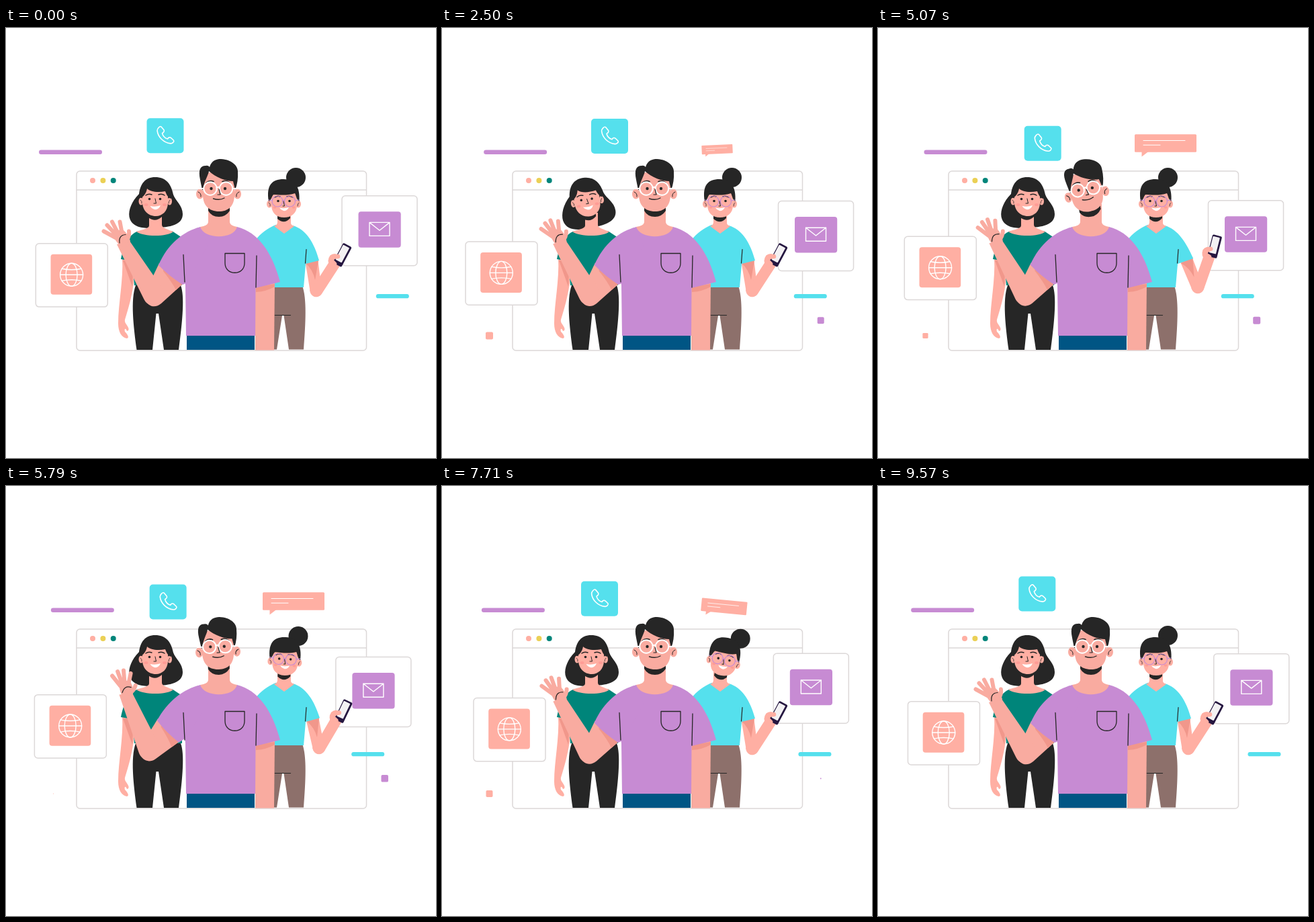
Animation of 640 by 640 pixels, one loop 9640 ms. Source, as an HTML page with a canvas:

```html
<!DOCTYPE html>
<html lang="en">
<head>
<meta charset="utf-8">
<title>Team greeting</title>
<style>
html, body { margin: 0; width: 100%; height: 100%; overflow: hidden; background: #fff; }
canvas { display: block; width: 640px; height: 640px; }
</style>
</head>
<body>
<canvas id="stage"></canvas>
<script>
const LOOP = 9640, FRAME = 1000 / 14;
const INK = '#262626', SKIN = '#ffafa3', TAN = '#f9aba0', SHADE = '#f1978b';
const PURPLE = '#c78bd3', TEAL = '#00857a', CYAN = '#55e0ed', GREY = '#dcd8d8';

const canvas = document.getElementById('stage');
const ctx = canvas.getContext('2d');
const dpr = window.devicePixelRatio || 1;
canvas.width = canvas.height = 640 * dpr;

function fill(color, d) {
  ctx.fillStyle = color;
  ctx.fill(new Path2D(d));
}
function line(color, width, d) {
  ctx.strokeStyle = color;
  ctx.lineWidth = width;
  ctx.lineCap = ctx.lineJoin = 'round';
  ctx.stroke(new Path2D(d));
}
function oval(color, x, y, rx, ry = rx) {
  ctx.fillStyle = color;
  ctx.beginPath();
  ctx.ellipse(x, y, rx, ry, 0, 0, 7);
  ctx.fill();
}
function ring(color, width, x, y, rx, ry = rx) {
  ctx.strokeStyle = color;
  ctx.lineWidth = width;
  ctx.beginPath();
  ctx.ellipse(x, y, rx, ry, 0, 0, 7);
  ctx.stroke();
}
function box(x, y, w, h, r, color, border) {
  ctx.beginPath();
  ctx.roundRect(x, y, w, h, r);
  ctx.fillStyle = color;
  ctx.fill();
  if (border) {
    ctx.strokeStyle = border;
    ctx.lineWidth = 1.5;
    ctx.stroke();
  }
}
function at(x, y, draw) {
  ctx.save();
  ctx.translate(x, y);
  draw();
  ctx.restore();
}
function spin(x, y, deg, draw) {
  ctx.save();
  ctx.translate(x, y);
  ctx.rotate(deg * Math.PI / 180);
  ctx.translate(-x, -y);
  draw();
  ctx.restore();
}
function turn(x, y, cx, cy, deg) {
  const c = Math.cos(deg * Math.PI / 180), s = Math.sin(deg * Math.PI / 180);
  return [cx + (x - cx) * c - (y - cy) * s, cy + (x - cx) * s + (y - cy) * c];
}

// Eased steps between [time, value] pairs, holding at both ends.
function keys(t, ...k) {
  if (t <= k[0][0]) return k[0][1];
  for (let i = 1; i < k.length; i++) {
    const [t0, a] = k[i - 1], [t1, b] = k[i];
    if (t < t1) {
      const u = (t - t0) / (t1 - t0);
      return a + (b - a) * u * u * (3 - 2 * u);
    }
  }
  return k[k.length - 1][1];
}

// Smooth closed curve through values at shared times.
const TIMES = [0, 1000, 2500, 3930, 5070, 6570, 7710];
function drift(t, v) {
  const n = TIMES.length;
  const time = i => TIMES[(i + n) % n] + LOOP * Math.floor(i / n);
  const val = i => v[(i + n) % n];
  const slope = i => (val(i + 1) - val(i - 1)) / (time(i + 1) - time(i - 1));
  let i = 0;
  while (i < n - 1 && t >= TIMES[i + 1]) i++;
  const h = time(i + 1) - time(i), u = (t - time(i)) / h, w = 1 - u;
  return (1 + 2 * u) * w * w * val(i) + u * w * w * h * slope(i)
    + u * u * (3 - 2 * u) * val(i + 1) - u * u * w * h * slope(i + 1);
}

function browser() {
  box(105, 213, 431.5, 267, 5, '#fff', GREY);
  line(GREY, 1.5, 'M105 241H536');
  oval(SKIN, 129, 227, 4);
  oval('#ebd055', 144.4, 227, 4);
  oval(TEAL, 159.7, 227, 4);
}

function globeCard() {
  box(0, 0, 107, 94.3, 5, '#fff', GREY);
  box(22.2, 16, 61.7, 60, 4, SKIN);
  at(53.3, 46.4, () => {
    ring('#fff', 1.4, 0, 0, 17);
    ring('#fff', 1.4, 0, 0, 8.5, 17);
    line('#fff', 1.4, 'M-17 0H17M-14.5 -9Q0 -6 14.5 -9M-14.5 9Q0 6 14.5 9');
  });
}

function mailCard() {
  box(0, 0, 112, 104, 5, '#fff', GREY);
  box(24.5, 23.5, 63.2, 53.5, 4, PURPLE);
  line('#fff', 1.4, 'M41 39.7H71V59.7H41ZM41 39.7L56 51.5L71 39.7');
}

function callCard() {
  box(0, 0, 55, 52, 5, CYAN);
  line('#fff', 1.6, 'M21.5 12.6L25.4 17.2C26.6 19 25.6 20.6 23 22.3C24 26.5 27 29.5 31 30.8C32.5 28.3 34.5 27.8 36.4 29.5L40 33C41.3 35 38 37.8 35.5 37.6C25 36.5 16.7 28 15.6 18.5C15.4 15.5 19.4 11.2 21.5 12.6Z');
}

function bubble(t) {
  const size = keys(t, [2200, 0], [2800, 1], [7500, 1], [8140, 0]);
  if (size < 0.01) return;
  const tilt = (1 - size) * (t < 5000 ? -5 : 21);
  ctx.save();
  ctx.translate(392, 191.5);
  ctx.rotate(tilt * Math.PI / 180);
  ctx.scale(size, size);
  box(-10, -33.3, 92, 26.5, 1.5, SKIN);
  fill(SKIN, 'M.5 -8V0L11 -8Z');
  line('#fff', 1, 'M3 -24H65M3 -17.3H28');
  ctx.restore();
}

function square(color, x, y, s) {
  if (s > 0.2) box(x - s / 2, y - s / 2, s, s, s * 0.18, color);
}

function leftWoman(tilt) {
  // Resting arm and hand
  fill(SKIN, 'M173 342C175 375 167 410 167 440C167 452 172 461 180 462C184 461 181 456 177 452C176 449 177 446 179 449C180 453 184 450 182 446C180 441 176 439 177 434C183 415 187 400 190 380V342Z');
  fill(SHADE, 'M174 346L188 385L190 346Z');
  fill(INK, 'M193 383H260C266 398 263 435 257 479H235L227 425H223.5L218 479H194.5C190 445 185 405 193 383Z');
  fill(TEAL, 'M197 302C181 308 175 325 171 344L188 347L191 383H262V312L247 302Z');
  spin(223, 308, tilt, () => {
    fill(INK, 'M222 222C207 222 200 232 198 247C187 258 182 271 183.5 281C187 298 207 299 222 297C244 297 263 293 263 277C263 264 252 257 249 248C246 232 238 222 222 222Z');
  });
  fill(SKIN, 'M213 275H232V293C232 298 242 300 249 303C240 311 205 311 194 303C202 300 213 299 213 294Z');
  spin(223, 300, tilt, () => {
    fill(INK, 'M212 271H232V281Q222 290 212 282Z');
    oval(SKIN, 201, 258, 3.5, 5.5);
    oval(SKIN, 243.5, 258, 3.5, 5.5);
    line(INK, .8, 'M200 256Q203 258 202 261M244 256Q242 258 242 261');
    fill(SKIN, 'M203 243C203 230 241 230 241 245V260C241 273 232 280 223 280C211 280 203 271 203 259Z');
    fill(INK, 'M200 253C199 232 207 224 222 224C238 224 246 236 245 254C241 253 238 246 237 243C226 245 215 244 210 239C209 246 204 252 200 253Z');
    line(INK, 1.5, 'M208 249Q212 246 217 248M227 248Q232 246 236 249');
    oval(INK, 213.5, 254.5, 1.8);
    oval(INK, 229.5, 254.5, 1.8);
    line(INK, 1, 'M222 254L223.5 261H220');
    fill('#fff', 'M214.5 265Q222 267 230 264Q227 271 221 270Q217 269 214.5 265Z');
    oval('#ff9c96', 208.5, 263, 3, 2);
    oval('#ff9c96', 236, 263, 3, 2);
  });
}

function rightWoman(tilt, raise, swing) {
  fill('#8d706b', 'M385 384H441C448 402 446 440 443 478.5H421L413.5 428H411L403 478.5H385Z');
  line(INK, 1.2, 'M400 427.5H423.5');

  const [ex, ey] = turn(461, 391, 448, 330, -14 * raise);
  spin(448, 330, -14 * raise, () => {
    fill(SKIN, 'M445 345L464 343L468 375L471 393C468 402 457 403 453 394Z');
    fill(SHADE, 'M446 350L465 346L460 375Q457 360 446 350Z');
  });
  at(ex - 461, ey - 391, () => spin(461, 391, swing, () => {
    fill(SKIN, 'M452 390C454 402 466 403 471 394L497 354L481 348L463 376Z');
    oval(SKIN, 489, 346.5, 9.5, 10.5);
    spin(500.5, 337.5, 28, () => {
      box(493.5, 321, 14.5, 33.5, 2, '#251640');
      box(494.7, 323.5, 10.5, 25, 1, '#f3f1f3');
    });
    line(SKIN, 6.5, 'M485 341L494 340M487 349L489 351');
  }));

  const [cx, cy] = turn(466, 346, 443, 318, -7 * raise);
  fill(CYAN, `M401 293C390 298 378 306 372 315V386H443L446 351L${cx} ${cy}C459 320 447 300 427 294Z`);
  line(INK, 1.2, 'M447 329.5L445.5 350');
  fill(SKIN, 'M404 277H424V290C424 293 427 294 429 295L414 306L399 295C402 294 404 292 404 289Z');

  spin(414, 288, tilt, () => {
    fill(INK, 'M404 274H423V283Q414 293 404 284Z');
    oval(INK, 431.5, 222.5, 14.5);
    oval(SKIN, 392, 262, 4, 5.5);
    oval(SKIN, 435, 262, 4, 5.5);
    line(INK, .8, 'M391 260Q394 261 393 265M436 260Q434 261 434 265');
    fill(SKIN, 'M395 243H433V264C433 276 424 282 414 282C402 282 395 275 395 263Z');
    fill(INK, 'M391 258C387 234 396 225 413 225C430 225 438 236 436.5 258C433 257 432 250 430 246C419 250 405 248 398 248C395 251 395 257 391 258Z');
    line(INK, 1.4, 'M400 252Q404 249 408 251M418 251Q422 249 427 252');
    oval(INK, 405, 257.5, 1.8);
    oval(INK, 422, 257.5, 1.8);
    ring(PURPLE, 1.2, 404, 258, 8);
    ring(PURPLE, 1.2, 422.5, 258, 8);
    line(PURPLE, 1.2, 'M412 257Q413 256 414.5 257M396 257L391 256M430.5 257L436 256');
    line(INK, 1, 'M413 258L414.5 265H412');
    fill('#fff', 'M407 267.5Q414 269 421 267Q418 273 413 272Q409 271 407 267.5Z');
    oval('#ff9c96', 400, 267, 2.5, 1.7);
    oval('#ff9c96', 428, 267, 2.5, 1.7);
  });
}

function wavingArm(wave, flick) {
  spin(262, 330, 18 * wave, () => {
    fill(TAN, 'M228 350L219 369L207 403C211 416 223 417 231 410L263 381L255 345Z');
    fill(SHADE, 'M234 356L263 381L253 390Q247 378 234 362Z');
  });
  const [ex, ey] = turn(222, 400, 262, 330, 18 * wave);
  at(ex - 222, ey - 400, () => spin(222, 400, 22 * wave, () => {
    fill(TAN, 'M165 322L205 403C210 414 223 417 232 408C241 396 231 382 220 369L184 317Z');
    spin(174, 320, 23 * flick, () => {
      fill(TAN, 'M158 307Q163 299 175 301Q182 307 185 317Q183 326 176 327Q167 325 158 307Z');
      line(TAN, 6, 'M163 312L145.5 302.5M164 308L150.5 293.5M167 306L158 288.5M173 307L169.5 288.5M179 317Q184 311 183 302.5');
      line(INK, 1.2, 'M169 320C168 312 171 308 178 307.5');
    });
  }));
}

function man(tilt, wave, flick) {
  wavingArm(wave, flick);
  fill(TAN, 'M371 375H400L399 479.5H371Z');
  fill(SHADE, 'M372 385L400 381L400 385Q388 392 372 393Z');
  fill('#005584', 'M269 456H370V479H269Z');
  fill(PURPLE, 'M290 296C279 299 268 305 259 314L267 383L268 458H371L371.5 387L408 378C396 333 375 304 344 296Z');
  const [ax, ay] = turn(240, 322, 262, 330, 18 * wave);
  const [bx, by] = turn(227, 353, 262, 330, 18 * wave);
  const [cx, cy] = turn(263, 382, 262, 330, 18 * wave);
  fill(PURPLE, `M290 296C264 302 ${ax} ${ay} ${bx} ${by}Q${(bx + cx) / 2 - 2} ${(by + cy) / 2 + 2} ${cx} ${cy}L268 ${380 - 15 * wave}L300 325Z`);
  line(INK, 1.3, 'M264 337.5L266 378M373 339L372 386M326 335.5H355V350C355 369 326 369 326 350Z');
  fill(TAN, 'M301 262H333V288C333 293 338 295 344 296C339 315 295 315 289 296C296 295 301 293 301 288Z');

  spin(316, 279, tilt, () => {
    fill(INK, 'M301 262H333V272Q327 281 317 281Q306 281 301 272Z');
    oval(TAN, 288.5, 247, 5.5, 7.5);
    oval(TAN, 344.5, 247, 5.5, 7.5);
    line(INK, 1, 'M286 244Q291 246 290 251M347 244Q342 246 343 251');
    fill(TAN, 'M293 215H340V248C340 266 330 273 317 273C302 273 293 264 293 248Z');
    fill(INK, 'M292 241L289 226C286 211 289 205 297 205Q301 204 303 207C306 197 313 195 320 195C336 196 345 205 345 213Q346 229 341 241L338 228C327 228 312 222 302 213C301 220 295 227 293 241Z');
    line(INK, 1.8, 'M298 230.5Q303 226 309 228.5M322 228.5Q328 226 333 230.5');
    oval(INK, 305.5, 239, 2.2);
    oval(INK, 326, 239, 2.2);
    ring('#fff', 2, 304, 239, 9.7);
    ring('#fff', 2, 327.5, 239, 9.7);
    line('#fff', 2, 'M313.5 237.5Q316 236 318 237.5M294 239L286 239M337.5 239L346 239');
    line(INK, 1.2, 'M317 240L319 248H315');
    line(INK, 1.4, 'M308.5 254Q318 257 325 253');
  });
}

function draw(t) {
  ctx.setTransform(dpr, 0, 0, dpr, 0, 0);
  ctx.fillStyle = '#fff';
  ctx.fillRect(0, 0, 640, 640);
  browser();

  const glide = drift(t, [0, .2, .675, .95, 1, .775, .51]);
  box(49 + 19.5 * glide, 181.5, 94, 6.5, 3.25, PURPLE);
  box(550.8 - 40 * glide, 396, 49, 6.3, 3.15, CYAN);

  at(drift(t, [209.5, 215, 222, 221, 217.7, 209.3, 207]),
    drift(t, [134.3, 131.7, 135, 141.3, 145.7, 146, 141.8]), callCard);
  at(drift(t, [44.3, 39.3, 35, 36, 39.3, 45.5, 47]),
    drift(t, [320.8, 321, 318, 313, 310.3, 312, 315.5]), globeCard);
  at(drift(t, [500, 502, 500.5, 495, 491.5, 491, 493.3]),
    drift(t, [249.7, 252.5, 257.5, 259, 256.7, 252, 249.3]), mailCard);

  bubble(t);
  square(SKIN, 70.5, 458, keys(t, [1500, 0], [2000, 11.5], [2600, 11], [3000, 10],
    [4950, 10], [5400, 0], [5700, 0], [6200, 11.5], [6650, 11], [7000, 10], [8050, 10], [8500, 0]));
  square(PURPLE, 563.7, 435.3, keys(t, [400, 0], [900, 11], [2500, 10], [3400, 10], [4170, 0],
    [4500, 0], [5000, 11], [6570, 10], [7100, 10], [7930, 0]));

  // The hand starts each wave earlier and ends it later than the arm.
  const beat = t < 7890 ? Math.abs(Math.sin(Math.PI * t / 2630)) : 0;
  leftWoman(keys(t, [1500, 0], [2200, -8], [2900, -8], [3600, 0]));
  rightWoman(
    keys(t, [5500, 0], [6300, 10.5], [7700, 11.5], [8600, 0]),
    keys(t, [2700, 0], [3600, 1], [5000, 1], [6200, 0]),
    keys(t, [2700, 0], [3700, -23], [4200, -23], [6200, 0]));
  man(keys(t, [2800, 0], [3600, -10], [5200, -10], [6000, 0]), beat ** 2, beat ** 0.8);
}

const start = performance.now();
function tick() {
  const t = (performance.now() - start) % LOOP;
  draw(Math.floor((t + 5) / FRAME) * FRAME % LOOP);
  requestAnimationFrame(tick);
}
tick();
</script>
</body>
</html>
```
